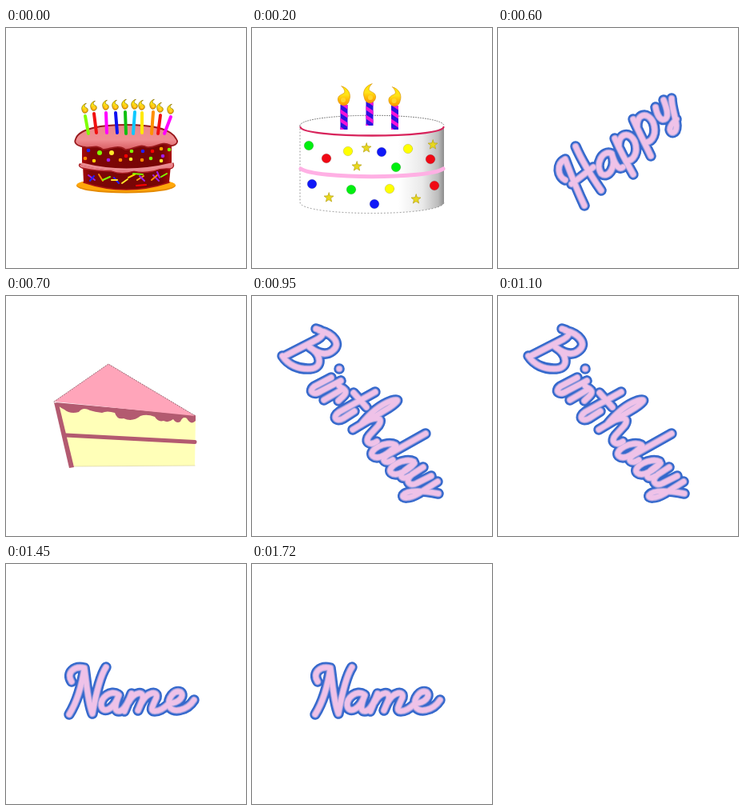
An HTML page with a canvas for the animation above (1.9 s loop, 300 px wide and 300 px high).

```html
<!DOCTYPE html>
<html lang="en">
<head>
<meta charset="utf-8">
<title>Happy Birthday</title>
<style>
html, body { margin: 0; width: 100%; height: 100%; overflow: hidden; background: #fff; }
canvas { display: block; }
</style>
</head>
<body>
<canvas id="stage" width="300" height="300" role="img" aria-label="Happy Birthday Name"></canvas>
<script>
const c = document.getElementById('stage').getContext('2d');
c.lineCap = c.lineJoin = 'round';

const fill = (d, color) => { c.fillStyle = color; c.fill(new Path2D(d)); };
const line = (d, color, width = 1) => {
  c.strokeStyle = color;
  c.lineWidth = width;
  c.stroke(new Path2D(d));
};
const oval = (x, y, rx, ry, color) => {
  c.beginPath();
  c.ellipse(x, y, rx, ry, 0, 0, 7);
  c.fillStyle = color;
  c.fill();
};
const dot = (x, y, r, color) => oval(x, y, r, r, color);
const fade = (x0, y0, x1, y1, ...stops) => {
  const g = c.createLinearGradient(x0, y0, x1, y1);
  stops.forEach(([at, color]) => g.addColorStop(at, color));
  return g;
};
const at = (x, y, sx, sy, draw) => {
  c.save();
  c.translate(x, y);
  c.scale(sx, sy);
  draw();
  c.restore();
};

function flame(x, y, size, dir, edge) {
  at(x, y, size * dir, size, () => {
    const d = 'M-3-17C5-15 10-7 7 1C6 6 3 8 0 8C-5 8-8 4-8 0C-8-5-3-6 0-8C2-10 0-14-3-17Z';
    fill(d, fade(0, -17, 0, 8, [0, '#ffe600'], [.45, '#ffe21a'], [.75, '#ffb400'], [1, '#ff9800']));
    line(d, edge, size < .6 ? 1.6 : .7);
    dot(-1, 1, 3.2, '#ffd52e');
  });
}

function star(x, y) {
  c.beginPath();
  for (let i = 0; i < 10; i++) {
    const r = i % 2 ? 2.7 : 6.3, a = i * Math.PI / 5 - Math.PI / 2;
    c.lineTo(x + r * Math.cos(a), y + r * Math.sin(a));
  }
  c.closePath();
  c.fillStyle = '#e8d81c';
  c.fill();
  c.strokeStyle = '#b7a31a';
  c.lineWidth = .7;
  c.stroke();
}

function lettering(d) {
  line(d, '#3468cc', 13.5);
  line(d, '#7f8ed8', 9);
  line(d, '#bfaee0', 7.6);
  line(d, '#efc2e8', 6);
}

function redCake() {
  oval(150, 197, 62, 9.5, '#e58a00');
  oval(150, 196, 61.5, 8.5, '#ffa70a');
  const red = fade(95, 0, 206, 0, [0, '#a80b0b'], [.1, '#7d0606'], [.9, '#760505'], [1, '#a80b0b']);
  fill('M96 172L97 193Q150 211 204 193L206 172Z', red);
  line('M97 193Q150 211 204 193', '#a51212', 1.5);

  const sticks = [
    [103, 184, 8, 6], [116, 183, 5, 8], [121, 190, 9, -4], [135, 187, 6, 7], [145, 194, 7, -5],
    [153, 187, 8, -4], [164, 190, 8, -5], [167, 185, 6, 6], [184, 184, 7, 7], [182, 190, 7, -6],
    [194, 186, 7, -4], [105, 191, 5, -6], [132, 190, 7, 0], [159, 182, 12, 1], [163, 197, 12, -1], [189, 180, 3, 7]
  ];
  const hues = ['#a020f0', '#ff8c00', '#7fff00', '#2020ff', '#ffe92b', '#ffd000', '#ff9e1a', '#a020f0'];
  sticks.forEach(([x, y, w, h], i) =>
    line(`M${x} ${y}l${w} ${h}`, i === 14 ? '#f00' : i === 13 ? '#7fff00' : hues[i % 8], 2));

  const band = 'M92 170Q150 186 209 169Q211 175 205 176Q194 175 184 179Q170 182 160 179Q145 184 132 179Q112 179 95 175Q90 173 92 170Z';
  fill(band, '#e98288');
  line(band, '#a91d22', 1.3);
  fill('M95 143L95 169Q150 184 207 169L207 143Z', red);
  line('M95 170Q150 184 207 170', '#ec8c92', 3);

  [[103, 153, '#2020ff'], [117, 156, '#7fff00'], [132, 156, '#ffe92b'], [99, 163, '#ff8c00'],
   [110, 166, '#ffd000'], [128, 165, '#a020f0'], [143, 165, '#ff8c00'], [150, 160, '#f00'],
   [157, 154, '#7fff00'], [156, 164, '#ffe92b'], [171, 154, '#2020ff'], [170, 165, '#ff8c00'],
   [181, 163, '#7fff00'], [183, 154, '#f00'], [194, 151, '#ffa500'], [196, 160, '#a020f0'],
   [204, 152, '#7fff00'], [194, 166, '#ffe92b']
  ].forEach(([x, y, color], i) => dot(x, y, i === 1 || i === 2 ? 3 : 2.3, color));

  const top = 'M87 139C91 125 122 121 150 121C181 121 207 126 213 139C217 144 209 149 204 146C195 141 185 151 176 149C166 144 159 153 149 152C140 145 130 152 121 152C114 145 106 151 99 149C91 148 84 145 87 139Z';
  fill(top, fade(0, 121, 0, 152, [0, '#e98a8a'], [.6, '#f08e92'], [1, '#d85d62']));
  line(top, '#98191c', 1.8);

  [[99, 110, 103, 132, '#7fff00'], [110, 107, 113, 131, '#f01010'], [125, 106, 126, 131, '#f0f'],
   [137, 106, 139, 131, '#1010f0'], [149, 105, 150, 132, '#10c010'], [161, 105, 159, 132, '#10c8ff'],
   [170, 106, 170, 131, '#ffe800'], [184, 105, 182, 132, '#ff9000'], [193, 109, 190, 132, '#f01010'],
   [206, 111, 198, 132, '#f0f']
  ].forEach(([x, y, x2, y2, color]) => {
    line(`M${x} ${y}L${x2} ${y2}`, color, 4);
    flame(x - .5, y - 7.5, .48, -1, '#8c7600');
  });
}

function whiteCake() {
  const side = 'M60 122V218C61 236 239 236 240 218V122Z';
  fill(side, fade(60, 0, 240, 0, [0, '#fff'], [.68, '#fff'], [.85, '#e9e9e9'], [.96, '#bbb'], [1, '#8d8d8d']));
  c.setLineDash([1, 3]);
  line('M60 122V218C61 236 239 236 240 218', '#777', .8);
  c.setLineDash([]);
  line('M61 176C80 189 220 189 239 176', '#ffb0e4', 5);
  oval(150, 122, 90, 12.5, '#fff');
  c.setLineDash([1, 2]);
  line('M60 122C62 105 238 105 240 122', '#555', .8);
  c.setLineDash([]);
  line('M60.5 124C65 138 235 138 239.5 124', '#d8245c', 2.3);

  const [g, r, y, b] = ['#00ef10', '#f00814', '#ffff00', '#1018f8'];
  [[71, 147, g], [93, 163, r], [120, 154, y], [162, 155, b], [195, 151, y], [223, 164, r],
   [180, 174, g], [75, 195, b], [124, 202, g], [153, 220, b], [172, 201, y], [228, 197, r]
  ].forEach(([x, y, color]) => {
    dot(x, y, 5.8, color);
    c.strokeStyle = '#0003';
    c.lineWidth = .7;
    c.stroke();
  });
  [[143, 150], [226, 146], [131, 173], [96, 212], [205, 214]].forEach(p => star(...p));

  [[115, 96, 89, 1], [147, 92, 86, -1], [178.5, 97, 90, 1]].forEach(([x, y, fy, dir]) => {
    c.save();
    c.beginPath();
    c.rect(x - 4.5, y, 9, 126 - y + (x < 140 || x > 160 ? 1 : -4));
    c.clip();
    c.fillStyle = '#2a12e0';
    c.fillRect(x - 5, y, 10, 36);
    for (let k = -4; k < 36; k += 11) line(`M${x - 6} ${y + k}l12 8`, '#f313d8', 4.2);
    c.restore();
    flame(x, fy, .95, dir, '#d89000');
  });
}

function slice() {
  fill('M62 134L237 151L236 212L82 213Z', '#ffffb8');
  line('M82 213L236 212', '#d8d2a0', .7);
  fill('M60 133L66 135L85 214L79 215Z', '#b35a70');
  line('M75 174L236 182.5', '#b35a70', 5);
  fill('M62 133L237 149V156Q231 162 226 153Q221 150 218 157Q213 160 209 154Q203 159 197 156Q190 158 186 151Q176 147 168 150Q158 158 147 153Q139 155 136 146Q126 143 120 146Q111 145 105 143Q96 138 91 145Q80 148 73 142Q66 139 62 133Z', '#b35a70');
  fill('M60 132L128 85L237 150Z', '#ffa5ba');
  c.setLineDash([1, 2]);
  line('M60 132L128 85L237 150', '#75404c', .8);
  c.setLineDash([]);
}

function dollop(x, y, s) {
  at(x, y, s, s, () => {
    fill('M-9-7L0-18L10-9Z', '#1010f0');
    fill('M-18-5Q-8-12 2-9L4 10Q-10 13-18-5Z', '#f01414');
    fill('M0-9Q10-12 19-4Q15 8 3 12Z', '#00d837');
    fill('M-9-8L-3-9L-3 3Q-6 5-8 0Z', '#00d837');
    fill('M2-9L9-8Q10-2 5 2Z', '#f01414');
    fill('M-5-2Q0-7 6-4Q9 4 2 9Q-6 6-5-2Z', '#fff');
    fill('M-16-6L-8-9L-10-1Z', '#fff');
  });
}

function beads(y, depth, under) {
  for (let i = 0; i <= 26; i++) {
    const x = 61 + i * 6.85, u = (x - 150) / 93;
    const by = y + depth * Math.sqrt(1 - u * u);
    dot(x, by - 1.7, 3, '#1818f0');
    dot(x, by + 2, 2.9, under);
    dot(x - 1.8, by + .4, 2.8, '#f01818');
    dot(x + 2, by + .4, 2.6, '#00d837');
    oval(x + .2, by + .2, 1.8, 2.2, '#fff');
  }
}

function darkCake() {
  const body = 'M59 130V211C62 228 239 228 242 211V130Z';
  fill(body, fade(59, 0, 242, 0, [0, '#2c0a0a'], [.2, '#431414'], [.5, '#3a0e0e'], [1, '#2b0808']));
  fill('M59 162C80 177 221 177 242 162V174C221 183 80 183 59 174Z', '#ffb6b6');
  [[68, 196], [86, 205], [103, 188], [116, 206], [137, 192], [163, 211], [187, 189], [211, 203], [238, 194]]
    .forEach(([x, y], i) => line(`M${x} 174V${y - 2}`, '#ffb6b6', i % 2 ? 7 : 6));
  oval(150, 132, 91.5, 12.5, '#2b0707');
  beads(131, 13, '#f01818');
  beads(210, 12, '#f45cd0');
  dollop(95, 114, .94);
  dollop(167, 117, .86);
  line('M149.5 99V126', '#ffd9ef', 9);
  line('M146 104l7-4M146 112l7-4M146 120l7-4M146 127l7-4', '#f060c0', 2.5);
  flame(149, 89, .95, -1, '#d89000');
  dollop(127, 117, 1.2);
  dollop(207, 118, 1.22);
}

const happy = () => lettering(
  'M84 190C75 186 72 170 84 164C90 180 99 203 108 222M97 148C106 169 118 187 129 203M92 195L119 174' +
  'M142 157C131 152 121 170 129 182C138 189 149 173 142 157C145 167 150 179 156 174' +
  'M146 138C153 154 161 169 169 183M151 149C150 132 164 128 171 142C176 156 169 166 161 166' +
  'M169 114C176 130 184 145 191 160M174 124C173 107 187 104 194 118C199 132 193 142 185 143' +
  'M197 99C199 110 204 118 210 113C214 108 210 98 207 90M217 88C217 99 222 111 223 122C223 132 216 133 215 127C215 121 220 118 223 114');

const birthday = () => lettering(
  'M80 41C92 44 90 49 82 54L41 75M84 43C101 47 113 60 100 69C91 76 80 70 72 64C88 74 88 90 73 91C58 92 45 86 38 75' +
  'M99 102L78 113C70 119 77 125 86 119L111 106M109 91h.1' +
  'M111 106C105 109 108 113 114 116L90 130M114 116C121 121 114 125 108 131' +
  'M154 120L109 145C100 151 105 158 114 153L128 144M127 121L143 139' +
  'M126 167L171 140C184 131 185 128 174 131C160 136 148 146 136 161C152 150 166 150 158 162L147 174C140 182 147 188 156 182' +
  'M179 186C168 180 144 193 151 200C158 206 172 196 180 187M217 172L169 199C160 205 167 211 176 205' +
  'M202 207C191 201 167 214 174 221C181 227 196 217 203 209L191 218C182 225 188 231 197 225' +
  'M214 214L200 223C190 231 197 239 206 234L224 225M232 232L208 247C196 254 187 253 189 249C194 242 212 243 233 247');

const name = () => lettering(
  'M82 147C75 136 85 127 98 130C95 150 89 172 79 188M98 130C101 150 102 172 108 187C112 165 117 141 125 129' +
  'M140 163C131 157 118 167 119 177C121 188 135 182 141 164C136 176 135 184 141 184C146 184 151 176 154 169' +
  'M157 162L148 184M153 173C161 159 173 158 171 169L165 183M169 174C177 159 190 158 188 167C184 176 179 184 186 184C193 184 199 179 204 174' +
  'M204 174C216 174 224 165 218 160C210 157 202 168 204 177C207 187 226 184 235 170');

// Each scene with the time it ends, in ms.
const scenes = [
  [200, redCake], [450, whiteCake], [700, happy], [950, slice],
  [1200, birthday], [1450, darkCake], [1900, name]
];
const start = performance.now();
let shown;

function tick() {
  const t = (performance.now() - start) % 1900;
  const scene = scenes.find(([end]) => t < end)[1];
  if (scene !== shown) {
    c.clearRect(0, 0, 300, 300);
    scene();
    shown = scene;
  }
  requestAnimationFrame(tick);
}
tick();
</script>
</body>
</html>
```
